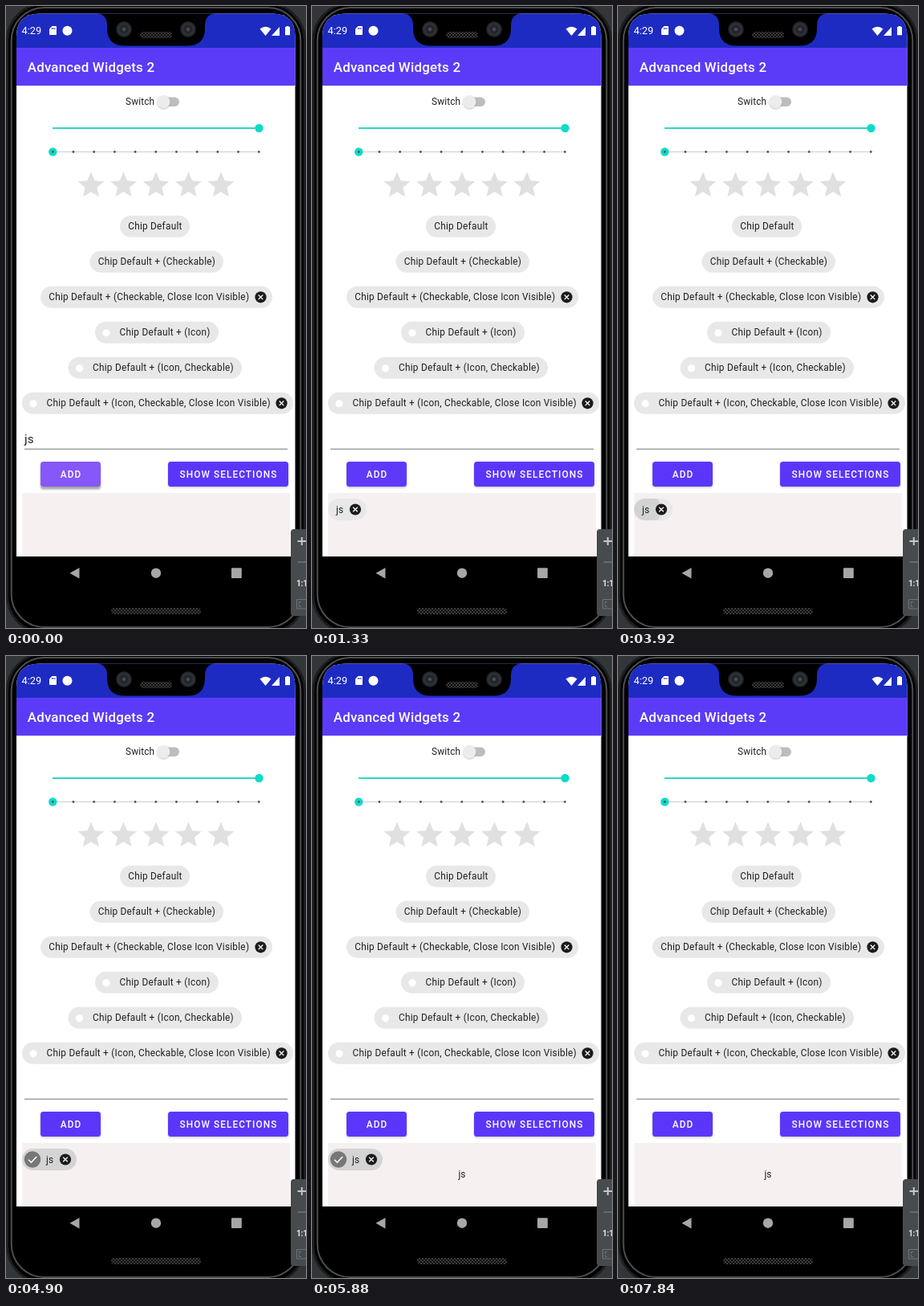
These frames come from a looping animation (374 by 774 pixels, 8 s). An HTML page:

```html
<!DOCTYPE html>
<html lang="en">
<head>
<meta charset="utf-8">
<title>Advanced Widgets</title>
<style>
  html, body { margin: 0; width: 100%; height: 100%; overflow: hidden; background: #333639; }
  svg { display: block; width: 374px; height: 774px; }
  text { font: 11.85px Roboto, sans-serif; fill: #202020; }
  .chip text { letter-spacing: .02em; }
  .button text { font-weight: 500; letter-spacing: .0893em; fill: #fff; text-anchor: middle; }
  .title { font-size: 16.9px; font-weight: 500; letter-spacing: .0125em; fill: #fff; }
</style>
</head>
<body>
<svg viewBox="0 0 374 774">
  <defs>
    <pattern id="mesh" width="4" height="4" patternUnits="userSpaceOnUse">
      <rect width="4" height="4" fill="#0c0c0c"/>
      <path d="M0 0L4 4M4 0L0 4" stroke="#484848" stroke-width=".8"/>
    </pattern>
    <radialGradient id="lens">
      <stop offset="0" stop-color="#5a6068"/>
      <stop offset=".35" stop-color="#1d2126"/>
      <stop offset=".7" stop-color="#30343a"/>
      <stop offset="1" stop-color="#17191c"/>
    </radialGradient>
    <filter id="soft" x="-20%" y="-40%" width="140%" height="200%"><feGaussianBlur stdDeviation="1.3"/></filter>
    <clipPath id="screen"><path d="M13 685V38Q13 9.6 42 9.6H332Q360.5 9.6 360.5 38V685Z"/></clipPath>
    <clipPath id="chipClip"><rect id="chipClipShape" x="20" y="613" height="27" rx="13.5"/></clipPath>
  </defs>

  <!-- Phone body -->
  <rect x="1.5" y="-3" width="371" height="783" rx="46" fill="#000" stroke="#1d1e20" stroke-width="3"/>
  <rect x="6.7" y="2" width="360.6" height="771" rx="41" fill="#000" stroke="#4c4e50" stroke-width="2"/>

  <g clip-path="url(#screen)">
    <rect x="13" y="9" width="348" height="676" fill="#fff"/>
    <rect x="13" y="9" width="348" height="43" fill="#1d2bc2"/>
    <rect x="13" y="52" width="348" height="47" fill="#5c3bf8"/>
    <rect x="13" y="99" width="348" height="1" fill="#e8e8e8"/>
    <path d="M112 9Q126 10 126 24V28Q126 49.5 148 49.5H226Q248 49.5 248 28V24Q248 10 262 9Z" fill="#000"/>
  </g>
  <circle cx="147" cy="29" r="10" fill="url(#lens)"/>
  <circle cx="227" cy="29" r="10" fill="url(#lens)"/>
  <rect x="167" y="32" width="40" height="8" rx="4" fill="url(#mesh)"/>
  <rect x="131" y="749" width="112" height="8" rx="4" fill="url(#mesh)"/>

  <!-- Status and title bars -->
  <text x="19.5" y="35.3" style="font-size:12.8px;fill:#fff">4:29</text>
  <g fill="#fff">
    <path d="M57.5 25H62Q63 25 63 26V35Q63 36 62 36H55Q54 36 54 35V28.5Z"/>
    <path d="M57.5 27v2M59.2 27v2M61 27v2" stroke="#1d2bc2" stroke-width=".9"/>
    <circle cx="76.5" cy="30.8" r="6"/>
    <path d="M316.5 28.5Q323.5 23 330.5 28.5L323.5 37Z"/>
    <path d="M341 26V37H331Z"/>
    <path d="M349.5 26V25H352.5V26H354V36.3H348V26Z"/>
  </g>
  <text class="title" x="26.7" y="82">Advanced Widgets 2</text>

  <!-- Switch and sliders -->
  <text x="149" y="123.3" style="letter-spacing:.01em">Switch</text>
  <rect x="193" y="113.5" width="23" height="11.5" rx="5.75" fill="#bdbdbd"/>
  <circle cx="196.5" cy="120.3" r="8" fill="#888" opacity=".5" filter="url(#soft)"/>
  <circle cx="196.5" cy="119.3" r="8" fill="#ececec"/>
  <path d="M58 152H315.5" stroke="#2bdac9" stroke-width="2"/>
  <circle cx="315.5" cy="152" r="5.2" fill="#0bdcc8"/>
  <path d="M58 181.5H315.5" stroke="#d8d8d8" stroke-width="1.6"/>
  <circle cx="58.3" cy="181.5" r="5.2" fill="#0bdcc8"/>
  <g id="ticks" fill="#555"></g>
  <g id="stars" fill="#e0e0e0"></g>
  <g id="chips"></g>

  <!-- Input, buttons and selection panel -->
  <text id="input" x="23" y="544" style="font-size:15.2px">js</text>
  <path d="M23 551.3H351" stroke="#6f7979"/>
  <rect x="20" y="606" width="334" height="79" fill="#f6f0f0"/>
  <g id="buttons"></g>
  <g id="newChip">
    <g id="chipBody"></g>
    <g clip-path="url(#chipClip)"><circle id="ripple" cx="33" cy="627"/></g>
    <g id="chipFace"></g>
    <circle id="closeRipple" cx="74" cy="626.5"/>
  </g>
  <text id="message" x="187" y="648.8" text-anchor="middle">js</text>

  <!-- Navigation bar -->
  <g fill="#a7a7a7">
    <path d="M79.5 705.7L91.5 699V712.5Z"/>
    <circle cx="187" cy="705.7" r="6.2"/>
    <rect x="281" y="699.3" width="12.8" height="12.8" rx="1"/>
  </g>

  <!-- Side tool strip -->
  <path d="M374 651H359Q355 651 355 655V755Q355 759 359 759H374Z" fill="#484b4e"/>
  <path d="M363.5 666H374M368.8 661V671" stroke="#c5c7c8" stroke-width="2"/>
  <path d="M363.5 692H374" stroke="#737678" stroke-width="1.5"/>
  <text x="362" y="721.5" style="font-size:10.5px;font-weight:700;letter-spacing:-.04em;fill:#e1e2e3">1:1</text>
  <path d="M374 738.5H362.5V750H374M365.5 744V741.5H368M365.5 745V747.5H368" fill="none" stroke="#707376"/>
</svg>
<script>
const byId = id => document.getElementById(id);
const LOOP = 8000, STEP = 70;

const closeIcon = (x, y) =>
  `<circle cx="${x}" cy="${y}" r="7.1" fill="#1b1b1b"/>
   <path d="M${x - 2.8} ${y - 2.8}l5.6 5.6m0 -5.6l-5.6 5.6" stroke="#fff" stroke-width="1.3"/>`;

function chip(left, right, y, label, { icon, close }) {
  return `<g class="chip">
    <rect x="${left}" y="${y - 13.5}" width="${right - left}" height="27" rx="13.5" fill="#e8e8e8"/>
    ${icon ? `<circle cx="${left + 14}" cy="${y + .5}" r="4.6" fill="#fff"/>` : ''}
    <text x="${left + (icon ? 30.5 : 10.2)}" y="${y + 4}">${label}</text>
    ${close ? closeIcon(right - 14.5, y) : ''}</g>`;
}

function button(id, left, right, label) {
  const box = `x="${left}" width="${right - left}" height="31" rx="3.5"`;
  return `<g class="button" id="${id}">
    <rect ${box} class="shadow" fill="#000" filter="url(#soft)"/>
    <rect ${box} class="face" y="567"/>
    <text x="${(left + right) / 2 + .5}" y="587">${label}</text></g>`;
}

const repeat = (count, draw) => Array.from({ length: count }, (_, i) => draw(i)).join('');
byId('ticks').innerHTML = repeat(11, i => `<circle cx="${58.3 + i * 25.7}" cy="181.5" r="1.4"/>`);
byId('stars').innerHTML = repeat(5, i =>
  `<path transform="translate(${106 + i * 40.5} 222) scale(1.63) translate(-12 -11.6)"
    d="M12 17.27L18.18 21l-1.64-7.03L22 9.24l-7.19-.61L12 2 9.19 8.63 2 9.24l5.46 4.73L5.82 21z"/>`);
byId('chips').innerHTML = [
  [142, 229, '', {}],
  [104.5, 271, ' + (Checkable)', {}],
  [43, 332, ' + (Checkable, Close Icon Visible)', { close: true }],
  [111, 265, ' + (Icon)', { icon: true }],
  [77.5, 294, ' + (Icon, Checkable)', { icon: true }],
  [20, 358, ' + (Icon, Checkable, Close Icon Visible)', { icon: true, close: true }],
].map(([left, right, suffix, parts], i) =>
  chip(left, right, 274.3 + i * 44, 'Chip Default' + suffix, parts)).join('');
byId('buttons').innerHTML =
  button('add', 43, 118, 'ADD') + button('show', 202, 352, 'SHOW SELECTIONS');

const progress = (t, from, to) => Math.max(0, Math.min(1, (t - from) / (to - from)));
const mix = (a, b, k) => `rgb(${a.map((v, i) => Math.round(v + (b[i] - v) * k))})`;
const setVisible = (id, on) => byId(id).setAttribute('visibility', on ? 'visible' : 'hidden');

function setPress(id, amount) {
  const group = byId(id), shadow = group.querySelector('.shadow');
  group.querySelector('.face').setAttribute('fill', mix([91, 54, 250], [134, 87, 249], amount));
  shadow.setAttribute('y', 568.3 + 2.2 * amount);
  shadow.setAttribute('opacity', .22 + .13 * amount);
}

function setCircle(id, radius, opacity) {
  byId(id).setAttribute('r', radius);
  byId(id).setAttribute('opacity', opacity);
}

let wasChecked;
function drawNewChip(checked) {
  if (checked === wasChecked) return;
  wasChecked = checked;
  const width = checked ? 68 : 48, textX = checked ? 50 : 30;
  byId('chipClipShape').setAttribute('width', width);
  byId('chipBody').innerHTML =
    `<rect x="20" y="613" width="${width}" height="27" rx="13.5" fill="${checked ? '#d5d4d4' : '#e9e8e8'}"/>`;
  byId('chipFace').innerHTML =
    (checked ? `<circle cx="33" cy="626.5" r="10.2" fill="#777"/>
      <path d="M28 626.8l3.4 3.4 6.8 -7.2" fill="none" stroke="#fff" stroke-width="1.5"/>` : '') +
    `<g class="chip"><text x="${textX}" y="630.5">js</text></g>` + closeIcon(textX + 24, 626.5);
}

function render(t) {
  setPress('add', t < 1330 ? 1 : t < 1400 ? .1 : 0);
  setPress('show', progress(t, 4900, 5110) * (1 - progress(t, 5320, 5600)));
  setVisible('input', t < 1330);

  setVisible('newChip', t >= 1330 && t < 7420);
  drawNewChip(t >= 4130);
  const pressing = t >= 3710 && t < 4340;
  setCircle('ripple', pressing ? Math.min(70, (t - 3710) / 10) : 0, .09 * (1 - progress(t, 4060, 4340)));
  setCircle('closeRipple', t >= 7280 && t < 7420 ? 10 + 8 * progress(t, 7280, 7350) : 0, .1);

  byId('message').setAttribute('opacity', progress(t, 5530, 5880));
}

function frame() {
  const t = performance.now() % LOOP;
  render(Math.floor(t / STEP) * STEP);
  requestAnimationFrame(frame);
}
frame();
</script>
</body>
</html>
```
